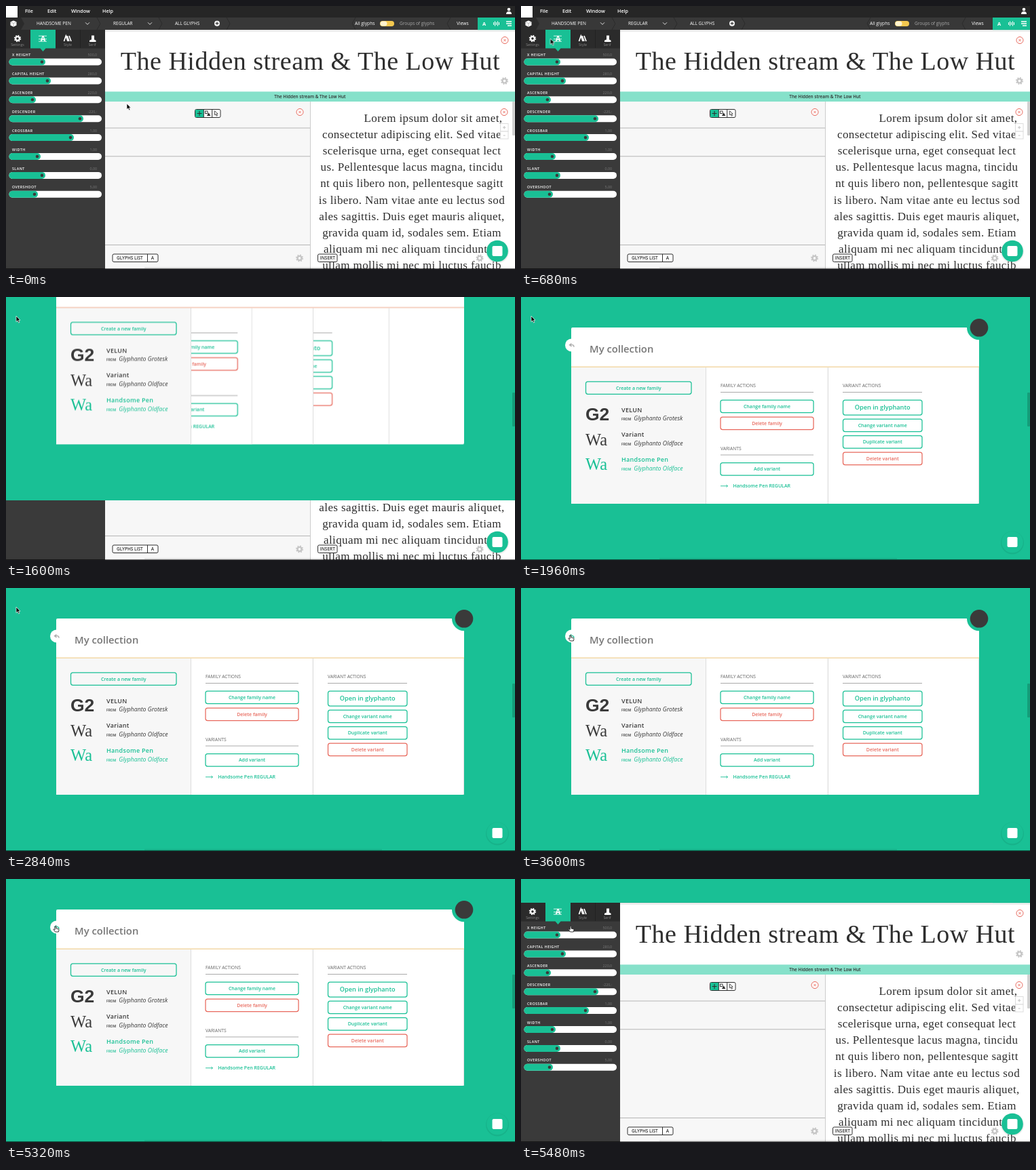
Write an HTML page that moves like this. It is 750x388 px and loops after 5.52 s.

```html
<!DOCTYPE html>
<html lang="en">
<head>
<meta charset="utf-8">
<title>Type editor and collection panel</title>
<style>
html, body { margin: 0; width: 100%; height: 100%; overflow: hidden; background: #fff; }
svg { display: block; width: 750px; height: 388px; }
text { font-family: "Open Sans", "Noto Sans", sans-serif; white-space: pre; }
.semi { font-weight: 600; }
.bold { font-weight: 700; }
.it { font-style: italic; }
.mid { text-anchor: middle; }
.end { text-anchor: end; }
.serif { font-family: "Liberation Serif", "Noto Serif", serif; }
.sans { font-family: "Liberation Sans", Arial, sans-serif; font-weight: 700; }
.caps { letter-spacing: .45px; }
.name { letter-spacing: .3px; }
.title { letter-spacing: .5px; }
.body { letter-spacing: .4px; }

.panel, .column, .rule, .cursor, .arrow, .hand, .tab, .back {
  animation: 5520ms linear infinite;
}
.panel { animation-name: panel; }
.column { animation-name: column; }
.rule { animation-name: rule; }
.cursor { animation-name: cursor; }
.arrow { animation-name: arrow; }
.hand { animation-name: hand; }
.tab { animation-name: tab; }
.back { animation-name: back; }

@keyframes panel {
  0%, 26.07% { transform: translateY(-400px); animation-timing-function: ease-in-out; }
  30.41% { transform: none; }
  96.38% { transform: none; animation-timing-function: cubic-bezier(.42, 0, .8, .8); }
  99.28%, 100% { transform: translateY(-353px); }
}
@keyframes column {
  0%, 26.41% { transform: translateX(var(--from)); animation-timing-function: ease-in-out; }
  31.48%, 100% { transform: none; }
}
@keyframes rule {
  0%, 29% { stroke: #efb8a0; }
  33%, 100% { stroke: #f0d093; }
}
@keyframes cursor {
  0%, 4.35% { transform: translate(178px, 144px); animation-timing-function: ease-in-out; }
  15.58% { transform: translate(15px, 28px); }
  54.35% { transform: translate(15px, 28px); animation-timing-function: ease-in-out; }
  62.32%, 100% { transform: translate(74px, 70px); }
}
@keyframes arrow {
  0%, 61.3% { opacity: 1; }
  61.31%, 100% { opacity: 0; }
}
@keyframes hand {
  0%, 61.3% { opacity: 0; }
  61.31%, 100% { opacity: 1; }
}
@keyframes tab {
  0%, 13.7% { fill: #2b2b2b; }
  13.71%, 100% { fill: #19c095; }
}
@keyframes back {
  0%, 61.3% { stroke: #aaa; }
  62.5%, 100% { stroke: #19c095; }
}
</style>
</head>
<body>
<svg id="stage" viewBox="0 0 750 388" xmlns="http://www.w3.org/2000/svg"></svg>
<script>
const GREEN = '#19c095', RED = '#e8685c', DARK = '#3a3a3a', INK = '#2e2e2e';
const HEADLINE = 'The Hidden stream &amp; The Low Hut';
const FAMILY = 'Handsome Pen';

const rect = (x, y, w, h, fill, more = '') =>
  `<rect x="${x}" y="${y}" width="${w}" height="${h}" fill="${fill}" ${more}/>`;
const text = (x, y, size, str, fill = '#fff', cls = '') =>
  `<text x="${x}" y="${y}" font-size="${size}" fill="${fill}" class="${cls}">${str}</text>`;
const path = (d, stroke, width = 1, more = '') =>
  `<path d="${d}" fill="none" stroke="${stroke}" stroke-width="${width}" ${more}/>`;
const shape = (d, fill, more = '') => `<path d="${d}" fill="${fill}" ${more}/>`;
const dot = (x, y, r, fill, more = '') => `<circle cx="${x}" cy="${y}" r="${r}" fill="${fill}" ${more}/>`;
const group = (body, more) => `<g ${more}>${body}</g>`;
const list = (items, draw) => items.map(draw).join('');

const gear = (x, y, color, k = 1) => group(
  dot(0, 0, 3, 'none', `stroke="${color}" stroke-width="2.2"`) +
  dot(0, 0, 4.7, 'none', `stroke="${color}" stroke-width="1.6" stroke-dasharray="1.9 1.79"`),
  `transform="translate(${x} ${y}) scale(${k})"`);

const closer = (x, y) =>
  dot(x, y, 5, '#fff', `stroke="${RED}" stroke-width="1"`) +
  path(`M${x - 1.8} ${y - 1.8}l3.6 3.6m0-3.6l-3.6 3.6`, RED, .9);

const outline = (x, y, w, h) => rect(x, y, w, h, '#fff', `rx="2" stroke="${INK}"`);

function menuBar() {
  const menus = [[28, 'File'], [61, 'Edit'], [96, 'Window'], [142, 'Help']];
  return rect(0, 0, 750, 17, '#262626') + rect(0, 0, 17, 17, '#fff') +
    list(menus, ([x, s]) => text(x, 10, 7.2, s, '#fff', 'semi')) +
    dot(741, 5, 2.3, '#fff') + shape('M737 12q0-4 4-4t4 4z', '#fff');
}

function toolBar() {
  const chevron = x => path(`M${x - 3} 24.3l3 3 3-3`, '#ddd');
  return rect(0, 17, 750, 18.5, '#383838') +
    shape('M0 17H22L27 26L22 35H0z', '#2b2b2b', 'class="tab"') +
    shape('M6.5 23.6l4.5-2 4.5 2v5l-4.5 2.2-4.5-2.2z', '#fff') +
    path('M6.5 23.6l4.5 2 4.5-2M11 25.6v5', '#888', .6) +
    list([134, 225, 325], x => path(`M${x} 17l5 9-5 9`, '#2b2b2b')) +
    list([515, 655], x => path(`M${x} 17l-5 9 5 9`, '#2b2b2b')) +
    text(45, 28.3, 6.5, FAMILY.toUpperCase()) + chevron(120) +
    text(158, 28.3, 6.5, 'REGULAR') + chevron(212) +
    text(249, 28.3, 6.5, 'ALL GLYPHS') +
    dot(311, 25.7, 4, '#fff') + path('M308.6 25.7h4.8M311 23.3v4.8', '#333', 1.2) +
    text(514, 28.3, 6.7, 'All glyphs') +
    rect(551, 22, 21, 8, '#f4c84f', 'rx="4"') + rect(551.5, 22.5, 10, 7, '#fff3cf', 'rx="3.5"') +
    text(580, 28.3, 6.5, 'Groups of glyphs', '#aaa') +
    text(664, 28.3, 6.7, 'Views') +
    rect(695, 17, 55, 18.5, GREEN) + text(704.5, 28.6, 7.5, 'A', '#fff', 'bold mid') +
    path('M718.5 24v4M720.5 22.5v7M722.5 24v4M724.5 22.5v7M726.5 24v4', '#fff') +
    path('M737 23h8M737 26h8M739 29h6', '#fff', 1.5);
}

function sideBar() {
  const sliders = [
    ['X HEIGHT', '500,0', 53], ['CAPITAL HEIGHT', '280,0', 61], ['ASCENDER', '220,0', 39],
    ['DESCENDER', '-220,:', 109], ['CROSSBAR', '1,00', 95], ['WIDTH', '1,00', 46],
    ['SLANT', '0,00', 53], ['OVERSHOOT', '5,00', 42]
  ];
  const slider = ([name, value, x], i) => {
    const y = 82.5 + i * 27.9;
    return text(9, y - 8.4, 5.3, name, '#fff', 'semi caps') +
      text(134, y - 8.4, 5.3, value, '#777', 'end') +
      rect(4.5, y - 5, 136.5, 10, '#fff', 'rx="5"') +
      rect(4.5, y - 5, x + .5, 10, GREEN, 'rx="5"') +
      dot(x, y, 2.3, DARK);
  };
  return rect(0, 35, 146, 353, DARK) + rect(0, 35, 146, 27.5, '#2b2b2b') +
    path('M109.5 35v27', '#222') +
    shape('M36 35H73V62.5H58.5L54.5 67L50.5 62.5H36z', GREEN) +
    gear(17, 48, '#fff', .95) +
    text(54.5, 52.4, 11, 'A', '#fff', 'bold mid') + path('M48 44.2h12M48 52.2h12M48 48.8h12', '#fff', .8) +
    path('M85.5 52l2.8-8 2.8 8M90 44l3 8M93 44l3 8', '#fff', 1.7) +
    shape('M126 43.5h4v6l2.5 1.2V53h-9.5v-2.3l3-1.2z', '#fff') +
    list([[17, 'Settings'], [91, 'Style'], [127, 'Serif']], ([x, s]) => text(x, 58.8, 5.3, s, '#858585', 'mid')) +
    list(sliders, slider);
}

function workspace() {
  const lines = [
    'Lorem ipsum dolor sit amet,', 'consectetur adipiscing elit. Sed vitae',
    'scelerisque urna, eget consequat lect', 'us. Pellentesque lacus magna, tincidu',
    'nt quis libero non, pellentesque sagitt', 'is libero. Nam vitae ante eu lectus sod',
    'ales sagittis. Duis eget mauris aliquet,', 'gravida quam id, sodales sem. Etiam',
    'aliquam mi nec aliquam tincidunt id', 'ullam mollis mi nec mi luctus faucib'
  ];
  return rect(146, 35.5, 604, 91, '#fff') + path('M146 37.5H750', '#ddd', .8) +
    text(448.5, 93.5, 38, HEADLINE, INK, 'serif mid title') +
    closer(735, 50.5) + gear(734.5, 110.5, '#c4c4c4') +
    rect(146, 126.3, 604, 14.7, '#86e1ca') + text(448, 136, 6.4, HEADLINE, INK, 'semi mid') +
    rect(146, 141, 302, 247, '#f7f7f7') +
    path('M146 180H448M146 221.8H448M146 352.5H448', '#b5b5b5') +
    outline(278.5, 152.5, 37.5, 12) + rect(279, 153, 12.3, 11, GREEN) +
    path('M291.3 152.5v12M303.7 152.5v12', INK) +
    path('M281.5 158.5h7M285 155v7', INK, 1.1) +
    rect(293.5, 155, 3.5, 3.5, 'none', `stroke="${INK}" stroke-width=".9"`) +
    shape('M296 162l2.7-4.8 2.7 4.8z', INK) +
    path('M307.5 154.8v6l1.5-1.3 1.3 2.8 1.2-.6-1.3-2.6h2z', INK, .8) +
    closer(433, 156.5) +
    outline(157, 366, 67, 11.5) + path('M208.5 366v11.5', INK) +
    text(163, 374.2, 6.5, 'GLYPHS LIST', INK, 'semi') + text(216, 374.2, 6.5, 'A', INK, 'semi mid') +
    gear(432.5, 372, '#c4c4c4') +
    rect(448, 141, 302, 247, '#fff') + path('M448.5 141V388', '#ccc') +
    list(lines, (s, i) => text(i ? 598 : 629.5, 171 + i * 24.1, 17, s, INK, 'serif mid body')) +
    closer(734, 156.5) +
    rect(728.5, 173.5, 11.5, 11.5, '#fff', 'stroke="#ddd" fill-opacity=".85"') +
    rect(728.5, 185, 11.5, 11, '#fff', 'stroke="#ddd" fill-opacity=".85"') +
    path('M732 179.2h4.5M734.2 177v4.5M732.7 191h3', '#bbb', .9) +
    outline(459.5, 366, 28.5, 11.5) + text(473.8, 374.2, 6.5, 'INSERT', INK, 'semi mid') +
    gear(698, 372, '#c4c4c4');
}

const button = (x, y, w, h, label, color = GREEN, size = 7) =>
  rect(x, y, w, h, 'none', `rx="3" stroke="${color}" stroke-width="1.25"`) +
  text(x + w / 2, y + h / 2 + size * .36, size, label, color, 'semi mid');

const heading = (x, y, right, label) =>
  text(x, y, 6.7, label, '#666') + path(`M${x} ${y + 7.5}H${right}`, '#aaa');

function family([name, base, mark, cls, size, color], i) {
  const y = 169.5 + i * 36.7;
  return text(95, y + 12.3, size, mark, color, cls) +
    text(148, y, 9, name, color, 'semi name') +
    text(148, y + 12.8, 5, 'FROM', color, 'semi') +
    text(166.3, y + 12.8, 8.8, 'Glyphanto ' + base, color, 'it');
}

function collection() {
  const families = [
    ['VELUN', 'Grotesk', 'G2', 'sans', 26.5, DARK],
    ['Variant', 'Oldface', 'Wa', 'serif', 24.5, DARK],
    [FAMILY, 'Oldface', 'Wa', 'serif', 24.5, GREEN]
  ];
  const familyActions = rect(272, 104, 180, 201, '#fff') +
    heading(294, 133, 431, 'FAMILY ACTIONS') +
    button(294, 152, 137, 18.5, 'Change family name') +
    button(294, 177, 137, 18.5, 'Delete family', RED) +
    heading(294, 225.5, 431, 'VARIANTS') +
    button(294, 244.5, 137, 18.5, 'Add variant') +
    path('M294 278.8h10.5m-2-1.7l2 1.7-2 1.7', GREEN, .9) +
    text(312.5, 280.8, 7, FAMILY + ' REGULAR', GREEN, 'semi') +
    path('M452.3 104V305', '#ddd');
  const variantActions = heading(474, 133, 591, 'VARIANT ACTIONS') +
    button(474.5, 152, 116.5, 22, 'Open in glyphanto', GREEN, 9.2) +
    button(474.5, 180, 116.5, 18.5, 'Change variant name') +
    button(474.5, 204.5, 116.5, 18.5, 'Duplicate variant') +
    button(474.5, 229, 116.5, 18.5, 'Delete variant', RED) +
    path('M674.7 104V305', '#ddd');
  const sliding = (body, clip, from) => group(
    group(body, `class="column" style="--from:${from}px"`), `clip-path="url(#${clip})"`);

  return rect(0, -20, 750, 408, GREEN) +
    rect(74, 45, 601, 260, '#fff', 'rx="2"') +
    rect(74, 104, 198, 201, '#f7f7f7') +
    text(101, 82, 14.8, 'My collection', '#777', 'semi') +
    button(95.5, 124.8, 155.5, 18.5, 'Create a new family') +
    list(families, family) +
    sliding(familyActions, 'second', -187) + sliding(variantActions, 'third', -230) +
    path('M272.5 104V305M452.5 104V305', '#ddd') +
    path('M74 103.2H675', '#f0d093', 1.3, 'class="rule"') +
    dot(74.5, 71, 9.5, '#fff') +
    path('M74.5 68.5l-3 2.2 3 2.2M71.8 70.7h3.7q2.5 0 2.5 3', '#aaa', 1.3, 'class="back"') +
    dot(675, 45.3, 18, GREEN) + dot(675, 45.3, 13.3, DARK);
}

const overlay = () =>
  rect(746, 141, 4, 50, '#000', 'rx="1" fill-opacity=".18"') +
  rect(204, 385, 350, 2, '#000', 'fill-opacity=".07"') + rect(0, 387, 750, 1, '#000', 'fill-opacity=".6"') +
  dot(724, 362.5, 17, '#000', 'fill-opacity=".07"') + dot(724, 361.5, 15.8, GREEN) +
  rect(716.5, 354, 15, 15, '#fff', 'rx="2"');

const pointer = () => group(
  shape('M0 0V8.6L2 6.8L3.6 10L5 9.3L3.5 6.2H6z', '#000',
    'class="arrow" stroke="#fff" stroke-width=".7"') +
  shape('M-1.8 0q1-1.2 1.8 0v3l3.2.8q1 .3.8 1.5l-.7 2.7H-1.4L-4 4.6q0-1.2 1.2-.6l1 .8z', '#fff',
    'class="hand" stroke="#222" stroke-width=".9"'),
  'class="cursor"');

document.getElementById('stage').innerHTML =
  `<clipPath id="second">${rect(272, 104, 181, 201, '#000')}</clipPath>` +
  `<clipPath id="third">${rect(452, 104, 223, 201, '#000')}</clipPath>` +
  menuBar() + toolBar() + sideBar() + workspace() +
  group(collection(), 'class="panel"') + overlay() + pointer();
</script>
</body>
</html>
```
